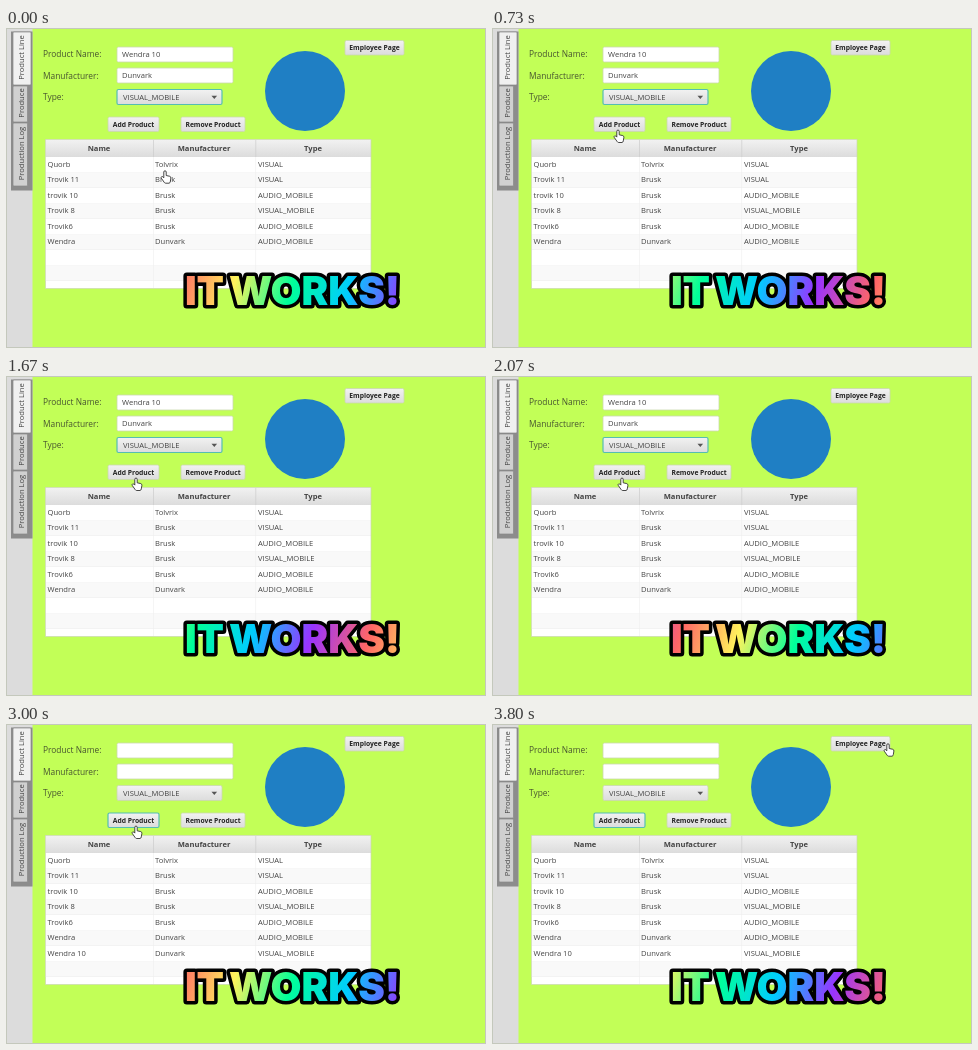
An HTML page for the animation above (3.87 s loop, 480x320 px).

```html
<!DOCTYPE html>
<html lang="en">
<head>
<meta charset="utf-8">
<title>Product form</title>
<style>
  html, body { margin: 0; height: 100%; overflow: hidden; background: #c2ff57; }
  svg { display: block; width: 100vw; height: 100vh; }
  text { font: 7.6px "Open Sans", "Noto Sans", sans-serif; fill: #444; }
  .label { font-size: 8.4px; fill: #485530; }
  .bold { font-weight: 700; text-anchor: middle; }
  .button { font-size: 6.75px; fill: #222; }
  .slogan {
    font: 900 40px Inter, "Open Sans", sans-serif; text-anchor: middle;
    fill: url(#rainbow); stroke: #000; stroke-width: 7px;
    stroke-linejoin: round; paint-order: stroke;
  }
</style>
</head>
<body>
<svg id="stage" viewBox="0 0 480 320">
  <defs>
    <linearGradient id="control" x2="0" y2="1">
      <stop stop-color="#f2f2f2"/><stop offset="1" stop-color="#dcdcdc"/>
    </linearGradient>
    <linearGradient id="rainbow" gradientUnits="userSpaceOnUse" spreadMethod="repeat"
                    x1="172" y1="248" x2="440" y2="328">
      <stop stop-color="#ff6666"/>
      <stop offset=".2" stop-color="#fff35c"/>
      <stop offset=".4" stop-color="#00ff99"/>
      <stop offset=".6" stop-color="#00ccff"/>
      <stop offset=".8" stop-color="#9933ff"/>
      <stop offset="1" stop-color="#ff6666"/>
    </linearGradient>
  </defs>
  <g id="form"></g>
  <text class="slogan" x="198.5" y="276.5">IT</text>
  <text class="slogan" x="308.5" y="276.5">WORKS!</text>
  <path id="hand" fill="#fff" stroke="#333" stroke-width=".9" stroke-linejoin="round"
    d="M-1.2 1a1.2 1.2 0 0 1 2.4 0v3.5l3.6.8q1.2.4 1.1 1.7l-.6 3.6q-.2 1.4-1.2 1.6h-3.4q-1 0-1.6-1l-2.8-4q-.6-1.2.4-1.6t2.1 1.2z"/>
</svg>
<script>
const LOOP = 3870, STEP = 1000 / 15;
const PRESS = 2470, RELEASE = 2600;
const BORDER = '#cbd8ae', FOCUS = '#55bdb2';
const $ = id => document.getElementById(id);

const rect = (x, y, w, h, fill, extra = '') =>
  `<rect x="${x}" y="${y}" width="${w}" height="${h}" fill="${fill}" ${extra}/>`;
const text = (x, y, string, extra = '') => `<text x="${x}" y="${y}" ${extra}>${string}</text>`;
const box = (x, y, w, h, fill, id = '') =>
  rect(x, y, w, h, fill, `id="${id}" rx="1.5" stroke="${BORDER}" stroke-width=".8"`);
const button = (x, y, w, label, id) =>
  box(x, y, w, 14.5, 'url(#control)', id) +
  text(x + w / 2, y + 9.6, label, 'class="bold button"');

function tabs() {
  const list = [['Product Line', 4, 53], ['Produce', 58, 36], ['Production Log', 95, 63]];
  return rect(0, 0, 26.5, 320, '#dcdcdc') + rect(5, 3.5, 21.5, 159, '#8c8c8c') +
    list.map(([name, y, h], i) =>
      rect(7, y, i ? 14.5 : 18, h, i ? '#d0d0d0' : '#f0f0f0', 'rx="1" stroke="#888" stroke-width=".7"') +
      `<text transform="translate(17.7 ${y + h / 2 - 1}) rotate(-90)" text-anchor="middle">${name}</text>`
    ).join('');
}

function fields() {
  return text(37, 29.2, 'Product Name:', 'class="label"') +
    text(37, 50.7, 'Manufacturer:', 'class="label"') +
    text(37, 72, 'Type:', 'class="label"') +
    box(111, 19, 116, 15, '#fff') + box(111, 40, 116, 15, '#fff') +
    `<g id="entry">${text(116, 29.4, 'Wendra 10')}${text(116, 50.4, 'Dunvark')}</g>` +
    box(111, 61.5, 105, 15, 'url(#control)', 'combo') +
    text(117, 71.9, 'VISUAL_MOBILE') +
    '<path d="M205.5 67.7h5.6l-2.8 3.2z" fill="#555"/>';
}

function table() {
  const rows = [
    ['Quorb', 'Tolvrix', 'VISUAL'],
    ['Trovik 11', 'Brusk', 'VISUAL'],
    ['trovik 10', 'Brusk', 'AUDIO_MOBILE'],
    ['Trovik 8', 'Brusk', 'VISUAL_MOBILE'],
    ['Trovik6', 'Brusk', 'AUDIO_MOBILE'],
    ['Wendra', 'Dunvark', 'AUDIO_MOBILE'],
    ['Wendra 10', 'Dunvark', 'VISUAL_MOBILE']
  ];
  const columns = [41.5, 149, 252], rowHeight = 15.5;
  let out = rect(39.5, 111.5, 325.5, 149, '#fff');
  for (let i = 0; i < 8; i++) {
    const y = 129 + i * rowHeight;
    out += rect(39.5, y, 325.5, rowHeight, i % 2 ? '#f9f9f9' : '#fff');
    out += rect(39.5, y + rowHeight - .5, 325.5, .5, '#ececec');
  }
  out += rect(39.5, 111.5, 325.5, 17.5, 'url(#control)');
  out += [147, 249.5].map(x =>
    rect(x, 112, .7, 17, '#ccc') + rect(x, 129, .6, 131, '#eee')).join('');
  out += [['Name', 93], ['Manufacturer', 198], ['Type', 307]].map(([name, x]) =>
    text(x, 123.2, name, 'class="bold"')).join('');
  out += rows.map((row, i) =>
    `<g id="row${i}">` +
    row.map((cell, c) => text(columns[c], 138.9 + i * rowHeight, cell)).join('') + '</g>').join('');
  return out + rect(39.5, 111.5, 325.5, 149, 'none', `stroke="${BORDER}" stroke-width=".7"`);
}

$('form').innerHTML = rect(0, 0, 480, 320, '#c2ff57') + tabs() + fields() +
  button(102, 89, 51, 'Add Product', 'add') +
  button(175, 89, 64, 'Remove Product') +
  button(339, 12.5, 59, 'Employee Page') +
  '<circle cx="299" cy="63" r="40" fill="#1f7fc4"/>' + table() +
  rect(.5, .5, 479, 319, 'none', 'stroke="#c4c8bc"');

// Pointer stops: time, x, y
const pointer = [
  [0, 159, 143], [130, 159, 143], [660, 126, 102.3], [800, 126, 102.3],
  [1000, 130, 102.3], [3130, 130, 102.3], [3700, 396, 20], [LOOP, 396, 20]
];

function pointerAt(t) {
  const i = pointer.findIndex(stop => stop[0] > t);
  const [t0, x0, y0] = pointer[i - 1], [t1, x1, y1] = pointer[i];
  const u = (t - t0) / (t1 - t0), ease = u * u * (3 - 2 * u);
  return [x0 + (x1 - x0) * ease, y0 + (y1 - y0) * ease];
}

function setFocus(id, on) {
  $(id).setAttribute('stroke', on ? FOCUS : BORDER);
  $(id).setAttribute('stroke-width', on ? 1.2 : .8);
}

function draw() {
  const now = performance.now() % LOOP;
  const t = Math.floor((now + 4) / STEP) * STEP % LOOP;
  $('rainbow').setAttribute('gradientTransform', `translate(${t % 1000 * .292} 0)`);
  $('hand').setAttribute('transform', `translate(${pointerAt(t)})`);
  setFocus('combo', t < PRESS - 5);
  setFocus('add', t >= PRESS - 5);
  const added = t >= RELEASE;
  $('entry').style.display = added ? 'none' : '';
  $('row6').style.display = added ? '' : 'none';
  requestAnimationFrame(draw);
}
draw();
</script>
</body>
</html>
```
